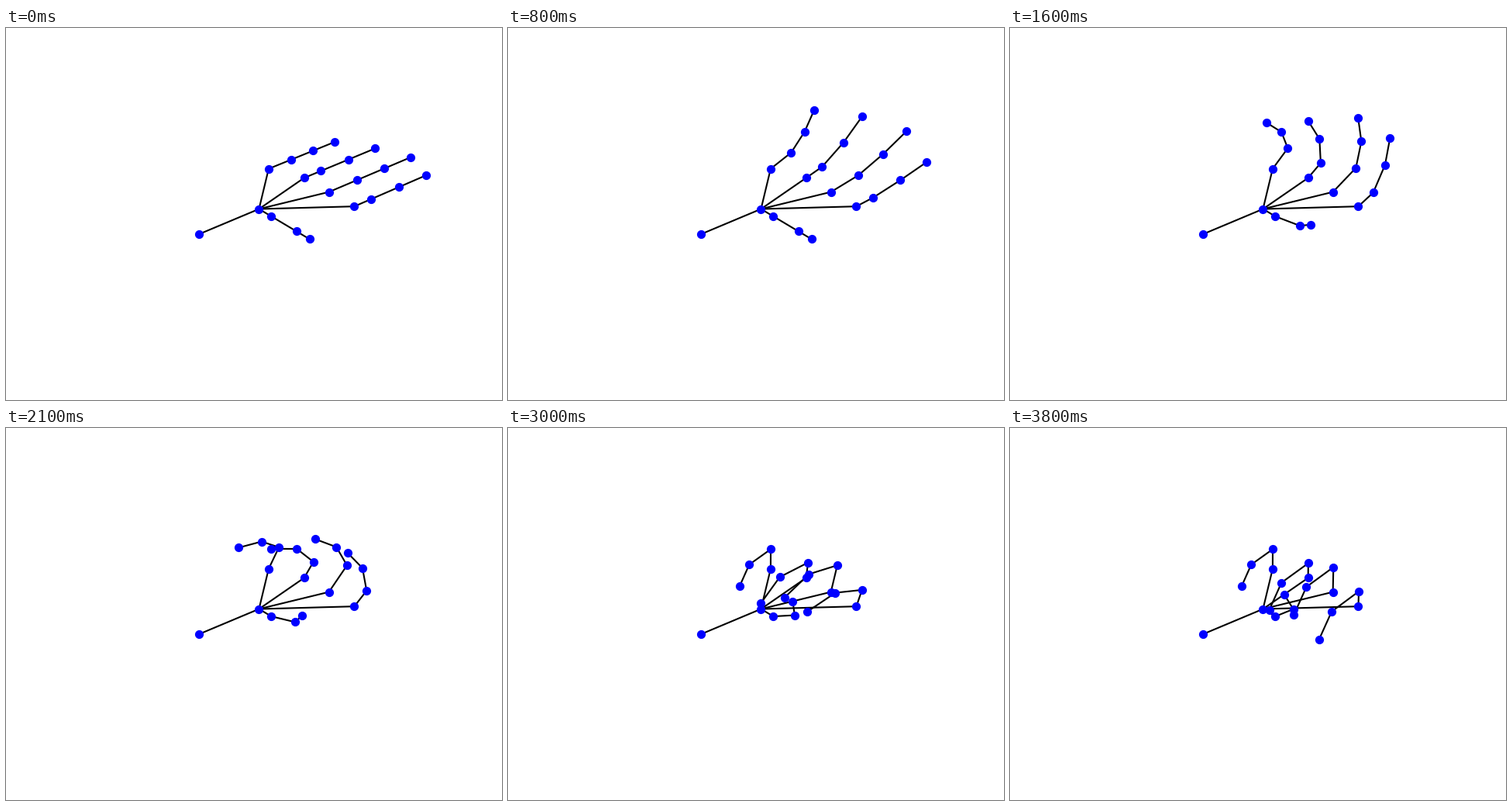
Recreate the animation shown at these times as a matplotlib script. Size 640 by 480 pixels, loop 4000 ms.

```python
import numpy as np
import matplotlib.pyplot as plt
from matplotlib.animation import FuncAnimation

W, H = 640, 480
FRAMES = 40
BEND_FRAMES = 30      # frames one digit needs to curl fully

# Perspective camera, in pixels
ELEV, AZIM = np.radians(30), np.radians(-40)
DIST = 2600
ZOOM = 0.988
Z_SCALE = 0.75
WRIST = np.array([326.45, 233.55])

SIDE, FORWARD = np.array([1, 0]), np.array([0, 1])
FINGER_BEND, THUMB_BEND = (90, 110, 45), (0, 45, 90)

# base (side, forward, height), rest direction, bone lengths, joint angles, delay
DIGITS = [
    ((-75, 80, 0), FORWARD, (40, 40, 40), FINGER_BEND, 0),
    ((-25, 100, 0), FORWARD, (30, 50, 50), FINGER_BEND, 2),
    ((25, 100, 0), FORWARD, (50, 50, 50), FINGER_BEND, 4),
    ((75, 100, 0), FORWARD, (30, 50, 50), FINGER_BEND, 6),
    ((0, 0, 0), SIDE, (25, 50, 25), THUMB_BEND, 8),
]
ELBOW = (0, -100, 0)


def project(points):
    """Map (side, forward, height) points to stage pixels."""
    x, y, z = np.asarray(points, float).T
    z = z * Z_SCALE
    se, ce, sa, ca = np.sin(ELEV), np.cos(ELEV), np.sin(AZIM), np.cos(AZIM)
    right = -sa * x + ca * y
    down = se * (ca * x + sa * y) - ce * z
    near = ce * (ca * x + sa * y) + se * z
    scale = ZOOM / (1 - near / DIST)
    return WRIST + scale[:, None] * np.column_stack([right, down])


def digit_points(base, direction, bones, bend, delay, frame):
    amount = np.clip((frame - delay) / BEND_FRAMES, 0, 1)
    angles = np.radians(np.cumsum(bend) * amount)
    steps = [(*(direction * size * np.cos(t)), size * np.sin(t))
             for size, t in zip(bones, angles)]
    return np.cumsum([base, *steps], axis=0)


def hand(frame):
    """Return the screen path of the forearm and of each digit."""
    wrist = (0, 0, 0)
    paths = [project([ELBOW, wrist])]
    for digit in DIGITS:
        points = digit_points(*digit, frame)
        if digit[1] is SIDE:      # the thumb starts at the wrist itself
            points = points[1:]
        paths.append(project([wrist, *points]))
    return paths


fig = plt.figure(figsize=(W / 100, H / 100), dpi=100, facecolor="white")
ax = fig.add_axes([0, 0, 1, 1])
ax.set_xlim(0, W)
ax.set_ylim(H, 0)
ax.axis("off")

bone_lines = [ax.plot([], [], color="black", lw=1.5, zorder=2)[0]
              for _ in range(len(DIGITS) + 1)]
joints = ax.scatter([], [], s=50, color="blue", zorder=3)


def update(frame):
    paths = hand(frame)
    for line, path in zip(bone_lines, paths):
        line.set_data(path[:, 0], path[:, 1])
    # the wrist is shared, so mark it only once
    joints.set_offsets(np.vstack([paths[0]] + [path[1:] for path in paths[1:]]))
    return [*bone_lines, joints]


anim = FuncAnimation(fig, update, frames=FRAMES, interval=100, repeat=True)
plt.show()
```
